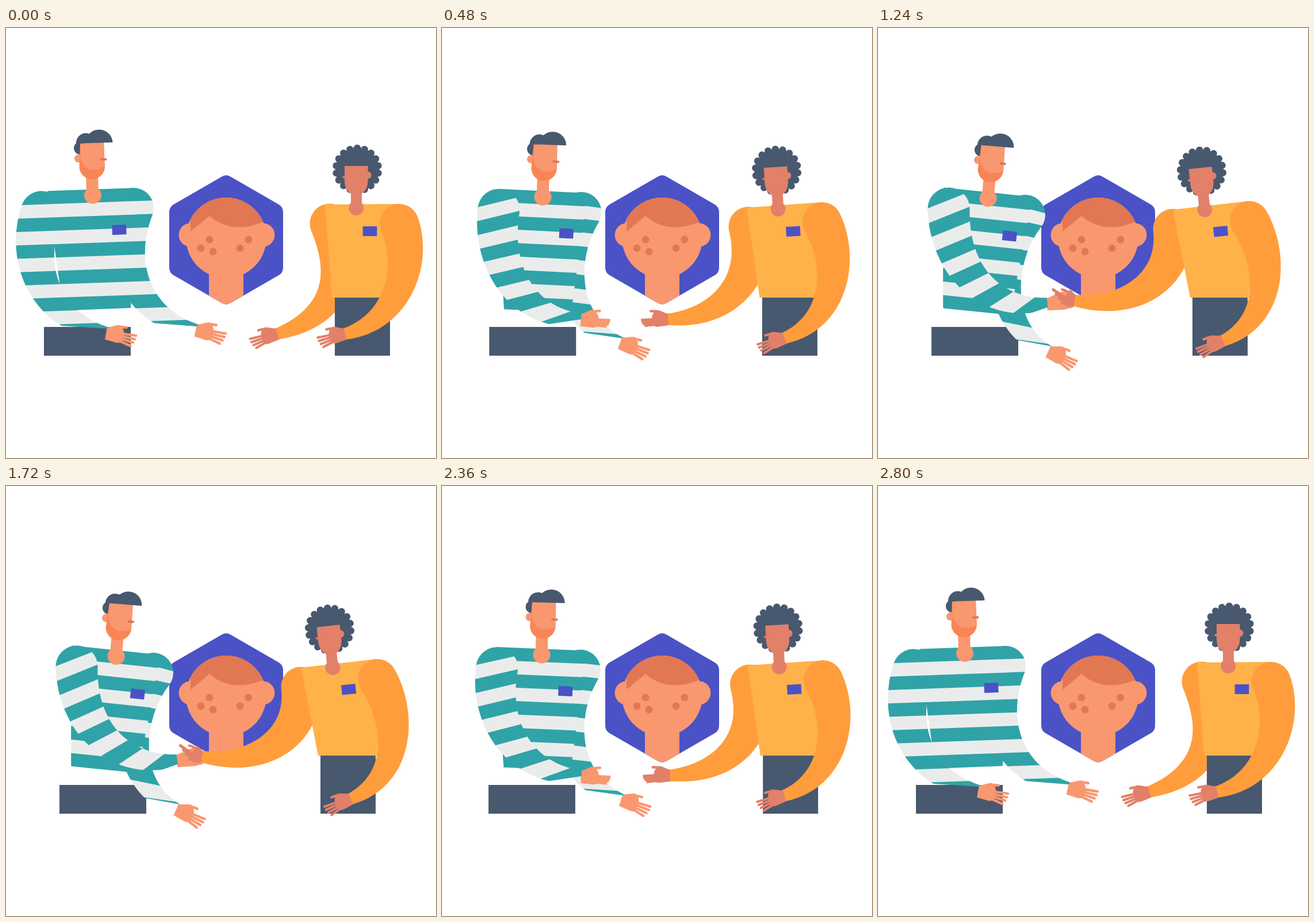
An HTML page with a canvas that plays this animation: 748 by 748 pixels, repeating every 3.88 s.

```html
<!DOCTYPE html>
<html lang="en">
<head>
<meta charset="utf-8">
<title>Handshake</title>
<style>
  html, body { margin: 0; width: 100%; height: 100%; overflow: hidden; background: #fff; }
  canvas { display: block; width: 748px; height: 748px; }
</style>
</head>
<body>
<canvas id="stage" width="748" height="748"></canvas>
<script>
const ctx = document.getElementById('stage').getContext('2d');
const TAU = Math.PI * 2, RAD = Math.PI / 180;
const LOOP = 3880, STEP = 40;
const C = {
  teal: '#30a3a8', pale: '#eaeceb', navy: '#48586e', blue: '#4a52c6',
  skin: '#f9976f', beard: '#f98556', freckle: '#e27853', lips: '#d9785f',
  brown: '#e2806a', shirt: '#ffb14a', sleeve: '#ff9d3c'
};

// Each arm is one Bezier centre line from shoulder to wrist, in two poses.
const arms = {
  manNear: {
    apart: [[62, 320], [28, 415], [75, 513], [175, 531]],
    met: [[123, 314], [123, 413], [182, 498], [287, 486]],
    radius: [36.5, 11], bow: [0, 4], lift: [11, -8], twist: 0.55
  },
  manFar: {
    apart: [[222, 313], [190, 400], [225, 504], [331, 526]],
    met: [[256, 325], [205, 395], [205, 522], [297, 563]],
    radius: [35, 11], twist: 0
  },
  womanFar: {
    apart: [[563, 340], [600, 436], [565, 505], [472, 532]],
    met: [[513, 349], [520, 430], [450, 498], [346, 482]],
    radius: [34.5, 10], bow: [-3, 5], lift: [-5, -11]
  },
  womanNear: {
    apart: [[684, 340], [712, 410], [683, 510], [590, 532]],
    met: [[646, 335], [686, 400], [690, 507], [600, 544]],
    radius: [34, 10]
  }
};

const lerp = (a, b, k) => a + (b - a) * k;
const mix = (a, b, k) => a.map((v, i) => lerp(v, b[i], k));
const clamp = v => Math.min(1, Math.max(0, v));

function bezier(line, u) {
  const v = 1 - u, w = [v ** 3, 3 * v * v * u, 3 * v * u * u, u ** 3];
  return [0, 1].map(d => line.reduce((sum, pt, i) => sum + w[i] * pt[d], 0));
}
function heading(line, u) {
  const [x, y] = bezier(line, u - 0.005), [x2, y2] = bezier(line, u + 0.005);
  return Math.atan2(y2 - y, x2 - x);
}

function pose(arm, p, s) {
  const { bow = [0, 0], lift = [0, 0] } = arm;
  const follow = [0, 0, 0.7, 1];
  return arm.apart.map((pt, i) => mix(pt, arm.met[i], p).map((v, d) =>
    v + follow[i] * (4 * p * (1 - p) * bow[d] + p * s * lift[d])));
}

function poly(points) {
  ctx.beginPath();
  for (const [x, y] of points) ctx.lineTo(x, y);
  ctx.closePath();
}
function fill(color) { ctx.fillStyle = color; ctx.fill(); }
function shape(d, color) { ctx.fillStyle = color; ctx.fill(new Path2D(d)); }
function disc(x, y, r, color) { ctx.beginPath(); ctx.arc(x, y, r, 0, TAU); fill(color); }
function rect(x, y, w, h, color) { ctx.fillStyle = color; ctx.fillRect(x, y, w, h); }
function stroke(d, width, color) {
  ctx.lineWidth = width;
  ctx.strokeStyle = color;
  ctx.lineCap = ctx.lineJoin = 'round';
  ctx.stroke(new Path2D(d));
}
function group(draw) { ctx.save(); draw(); ctx.restore(); }
function spin(x, y, deg) {
  ctx.translate(x, y);
  ctx.rotate(deg * RAD);
  ctx.translate(-x, -y);
}

// A tapering tube with a round shoulder.
function sleevePath(line, [r0, r1]) {
  const at = (u, r, a) => {
    const [x, y] = bezier(line, u);
    return [x + r * Math.cos(a), y + r * Math.sin(a)];
  };
  const left = [], right = [], cap = [];
  for (let i = 0; i <= 30; i++) {
    const u = i / 30, r = lerp(r0, r1, u ** 1.4), a = heading(line, u);
    left.unshift(at(u, r, a + TAU / 4));
    right.push(at(u, r, a - TAU / 4));
  }
  for (let i = 1; i < 16; i++) cap.push(at(0, r0, heading(line, 0) + TAU / 4 + i * TAU / 32));
  poly([...left, ...cap, ...right]);
}

// Stripes: edge k is a straight line; colours alternate between edges.
const stripeY = (k, x) => 309 + 23.3 * k - 0.035 * x;
function stripes(edge) {
  for (let k = -1; k < 10; k++) {
    const [a, b] = edge(k < 0 ? -3 : k), [c, d] = edge(k < 9 ? k + 1 : 14);
    poly([a, b, mix(b, d, 1.03), mix(a, c, 1.03)]);
    fill(k % 2 ? C.teal : C.pale);
  }
}

// Where stripe edge k crosses the centre line of the resting arm.
function crossing(line, k) {
  let lo = -0.4, hi = 1.3;
  for (let i = 0; i < 20; i++) {
    const u = (lo + hi) / 2, [x, y] = bezier(line, u);
    if (y < stripeY(k, x)) lo = u; else hi = u;
  }
  return lo;
}
function stripedSleeve(arm, line, p) {
  group(() => {
    sleevePath(line, arm.radius);
    ctx.clip();
    stripes(k => {
      const rest = crossing(arm.apart, k), u = rest * (1 + 0.06 * p);
      const [x, y] = bezier(line, u);
      const turn = heading(line, u) - heading(arm.apart, rest);
      const a = -2 * RAD + turn * (1 + arm.twist * u);
      const dx = 60 * Math.cos(a), dy = 60 * Math.sin(a);
      return [[x - dx, y - dy], [x + dx, y + dy]];
    });
  });
}

function hand(line, color, { flip = false, grip = 0, clasp = 0, palm = 1 } = {}) {
  const size = flip ? 0.94 : 1;
  group(() => {
    ctx.translate(...line[3]);
    ctx.rotate(heading(line, 1) + (flip ? Math.PI : 0));
    ctx.scale(flip ? -size : size, size);
    group(() => {
      ctx.scale(palm, 1);
      shape('M-1-10.5C8-12 12-17 20-18C25-17 29-10 30-5L29 9Q26 14 18 13L-1 11Z', color);
    });
    stroke(`M12-10Q17-16 ${lerp(32, 27, clasp)}-16`, 4.6, color);
    for (let i = 0; i < 4; i++) {
      const x = lerp(lerp(51, 48, grip) - 0.7 * i * i, 43 - 7 * i, clasp);
      const y = lerp(lerp(6.4 * i - 5, 3 * i + 1, grip), 7 * i - 13, clasp);
      stroke(`M${24 * Math.min(1, palm)} ${lerp(4.4 * i - 4, 3 * i, grip)}L${x} ${y}`, 4.4 + clasp, color);
    }
  });
}

function badge(x, y) { rect(x - 12.3, y - 8.5, 24.6, 17, C.blue); }

function hexagon() {
  const corners = [];
  for (let i = 0; i < 6; i++) {
    corners.push(383 + 97 * Math.sin(i * TAU / 6), 368.5 - 97 * Math.cos(i * TAU / 6));
  }
  const d = 'M' + corners.join(' ') + 'Z';
  shape(d, C.blue);
  stroke(d, 30, C.blue);
  disc(321, 360, 20.5, C.skin);
  disc(447, 360, 20.5, C.skin);
  shape('M353 420H413V465.5L390.5 478.5Q383 482.5 375.5 478.5L353 465.5Z', C.skin);
  group(() => {
    disc(383, 365, 70, C.skin);
    ctx.clip();
    shape('M321 354L354 327C380 350 415 353 455 334V290H321Z', C.freckle);
  });
  for (const [x, y] of [[354, 368], [339, 383], [360, 389], [422, 368], [407, 383]]) disc(x, y, 6.5, C.freckle);
}

function manHead() {
  disc(129, 209, 11, C.navy);
  disc(126, 227, 7, C.skin);
  shape('M139 255L160 254L161 291H140Z', C.skin);
  disc(151, 291, 15, C.skin);
  shape('M129 201L170 199L172 241A22.3 22.3 0 0 1 127.5 243Z', C.beard);
  shape('M129 201L170 199L171.5 241Q162 247 152 247Q136 246 129.5 226Z', C.skin);
  stroke('M165.5 228.4H173.5', 4, C.lips);
  shape('M122 201A17 17 0 0 1 145 184A23.5 23.5 0 0 1 185.5 199Z', C.navy);
}

function man(p, s) {
  rect(66 + 27 * p, 520, 151, 50, C.navy);

  const far = pose(arms.manFar, p, s);
  hand(far, C.skin);
  stripedSleeve(arms.manFar, far, p);

  group(() => {
    ctx.translate(27 * p, 0);
    spin(122, 391, 8 * p);
    group(() => {
      poly([[72, 283.5], [222, 278.3], [226, 300], [217, 487], [100, 491.5], [85, 386]]);
      ctx.clip();
      stripes(k => [40, 260].map(x => [x, stripeY(k, x)]));
    });
    group(() => { spin(197, 351, -2); badge(197, 351); });
    spin(151, 291, -1.6 * p);
    manHead();
  });

  const near = pose(arms.manNear, p, s);
  hand(near, C.skin, { grip: clamp(p / 0.75), palm: 1 + 0.4 * clamp(5 * p - 4) });
  stripedSleeve(arms.manNear, near, p);
}

function womanHead() {
  disc(611, 246, 38, C.navy);
  for (let i = 0; i < 18; i++) {
    const a = i * TAU / 18 - TAU / 4;
    disc(611 + 37 * Math.cos(a), 246 + 37 * Math.sin(a), 6.2, C.navy);
  }
  rect(600, 280, 19, 33, C.brown);
  disc(609.3, 313, 13, C.brown);
  disc(629, 256, 6.5, C.brown);
  shape('M589 240H629.5V266C629 282 620 290.5 609 291C598 290.5 589 281 589 266Z', C.brown);
  stroke('M587 259.5H590', 3.6, C.brown);
}

function womanSleeve(arm, line) {
  sleevePath(line, arm.radius);
  fill(C.sleeve);
}

function woman(p, s) {
  const far = pose(arms.womanFar, p, s), clasp = clamp(5 * p - 4);
  hand(far, C.brown, { flip: true, grip: clamp(p / 0.75), clasp, palm: 1 - 0.4 * clasp });
  womanSleeve(arms.womanFar, far);

  rect(572 - 25 * p, 469, 96, 101, C.navy);
  poly([
    [555 - 42 * p, 307 + 9 * p], [685 - 40 * p, 306 - 5 * p], [674 - 23 * p, 410],
    [668 - 23 * p, 469], [567 - 24 * p, 469]
  ]);
  fill(C.shirt);

  group(() => {
    ctx.translate(-41 * p, 3 * p);
    spin(609, 313, -6 * p);
    badge(633, 353.5);
    womanHead();
  });

  const near = pose(arms.womanNear, p, s);
  hand(near, C.brown, { flip: true });
  womanSleeve(arms.womanNear, near);
}

function reach(t) {
  if (t < 800) return t / 800;
  return t < 2000 ? 1 : clamp((2800 - t) / 800);
}
// Three linear half swings: up, down, up.
function shake(t) {
  const x = 3 * clamp((t - 1000) / 560);
  return x < 1 ? x : Math.abs(x - 2);
}

function frame(now) {
  const t = Math.floor(now % LOOP / STEP) * STEP;
  const p = reach(t), s = shake(t);
  rect(0, 0, 748, 748, '#fff');
  hexagon();
  man(p, s);
  woman(p, s);
  requestAnimationFrame(frame);
}
requestAnimationFrame(frame);
</script>
</body>
</html>
```
